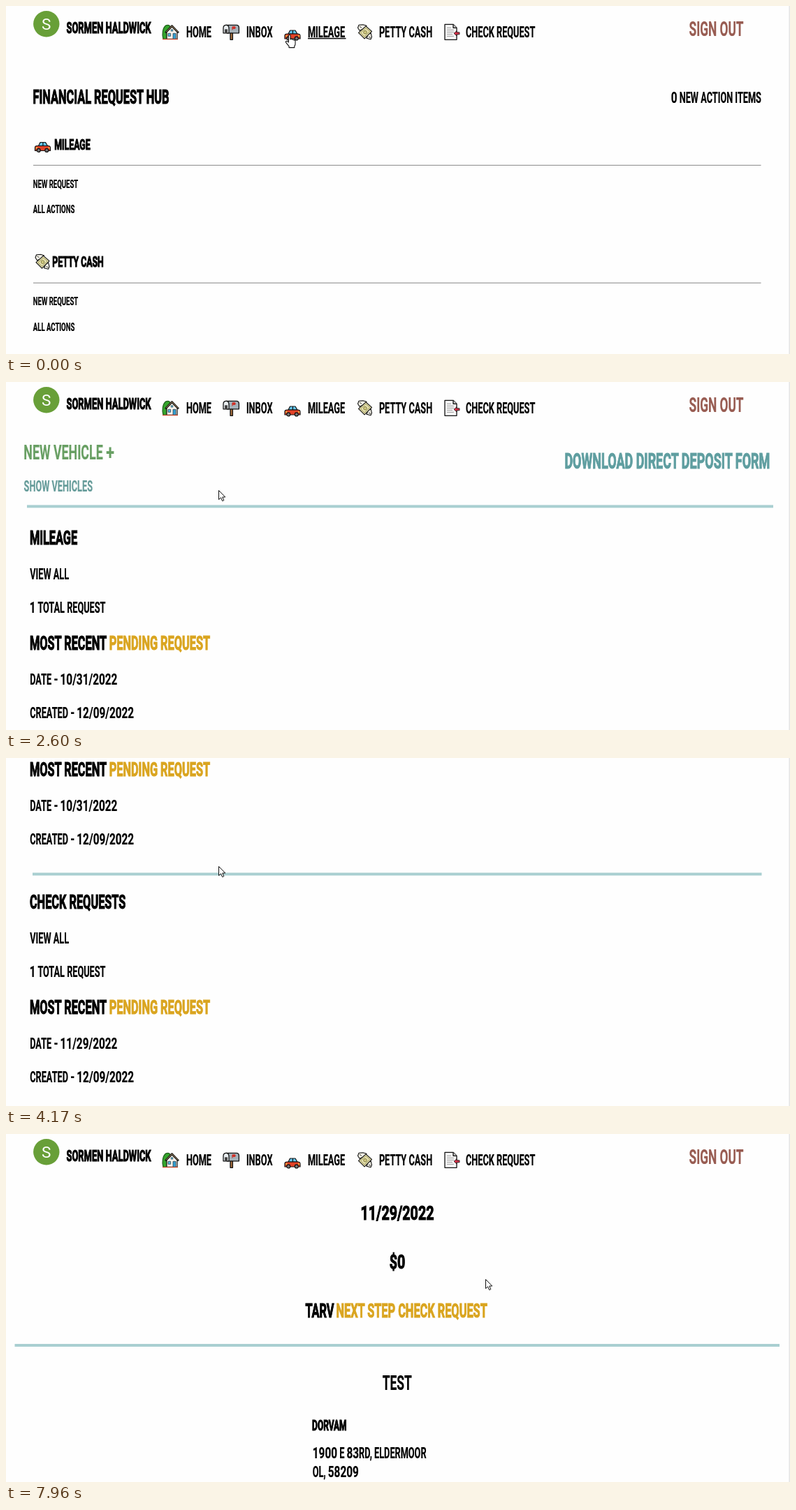
Write an HTML page that moves like this. It is 1122 px wide and 499 px high and loops after 8 s.

```html
<!DOCTYPE html>
<html lang="en">
<head>
<meta charset="utf-8">
<title>Financial request hub</title>
<style>
  html, body { margin: 0; width: 100%; height: 100%; overflow: hidden; background: #fefefe; }
  svg { display: block; width: 100%; height: 100%; }
  text { font: bold 16px Roboto, "Liberation Sans", sans-serif; white-space: pre; }
  .type text { stroke: currentColor; fill: currentColor; stroke-width: .2; vector-effect: non-scaling-stroke; }
  .heavy text { stroke-width: .95; }
</style>
</head>
<body>
<svg viewBox="0 0 1122 499" xmlns="http://www.w3.org/2000/svg">
  <defs>
    <g id="house" stroke="#111" stroke-width="1.2" stroke-linejoin="round">
      <path d="M2 22C0 15 1 6 6 2.5 10 1 13 3 13 8V22Z" fill="#35a52c" stroke="#1d5c18"/>
      <path d="M7 12 14.5 4.5 22 12V22H7Z" fill="#f6f4ee"/>
      <path d="M5 13 14.5 3 24 13" fill="none" stroke-width="2.4"/>
      <path d="M6 12 14.5 3.4 23 12" fill="none" stroke="#c9a577" stroke-width=".9"/>
      <path d="M9 14h3.6v4H9z" fill="#57bfe8" stroke-width=".6"/>
      <path d="M16 14h4v8h-4z" fill="#35a3d8" stroke-width=".6"/>
      <path d="M13.2 8.4h2.6v2.4h-2.6z" fill="#57bfe8" stroke-width=".5"/>
      <path d="M1 22.3H23" stroke="#c7472c"/>
    </g>
    <g id="mail" stroke="#111" stroke-width="1.3" stroke-linejoin="round">
      <path d="M11 13h3.4v10H11z" fill="#a9703f"/>
      <path d="M5 2H20Q23.4 2 23.4 6V13.5H6Z" fill="#a5b1b9"/>
      <path d="M1 13.5V6.5Q1 2 5 2T9 6.5V13.5Z" fill="#e9edf0"/>
      <path d="M3 8h4v5.5H3z" fill="#444" stroke="none"/>
      <path d="M14 9V4.5H18V7H15" fill="#e3352c" stroke="#c42a20" stroke-width="1"/>
    </g>
    <g id="car" stroke="#111" stroke-width="1.2" stroke-linejoin="round">
      <path d="M6 9 8.5 4H16L19 9Z" fill="#62c4ec"/>
      <path d="M12.4 4V9" fill="none"/>
      <path d="M1 16V11.5Q1 9 4 9H20Q23 9 23 12V16Z" fill="#e34227"/>
      <path d="M2 12h2.5M20 12h2.5" stroke="#ffd24a" stroke-width="1.5"/>
      <circle cx="6.2" cy="15.4" r="2.5" fill="#777"/>
      <circle cx="17.8" cy="15.4" r="2.5" fill="#777"/>
    </g>
    <g id="cash" stroke="#111" stroke-width="1.1" stroke-linejoin="round">
      <path d="M4 10 1.5 6 3 2 9 1.5 14 3 11 7ZM14 21 20 22.5 21.5 19 20 13 16 16Z" fill="#f4f2e8"/>
      <path d="M2.5 13 13 3.5 21.5 11 11 21.5Z" fill="#e6e1b0"/>
      <path d="M5.5 13 13 6.3 18.6 11 11 18.7Z" fill="none" stroke="#8d8746" stroke-width=".8"/>
      <circle cx="12" cy="12.4" r="2.3" fill="#d3cc85" stroke="#6f6a33" stroke-width=".8"/>
      <path d="M4 4 7 6M17 19 20 20" stroke-width=".8"/>
    </g>
    <g id="sheet" stroke="#111" stroke-width="1.3" stroke-linejoin="round">
      <path d="M2 1H14L19 6V23H2Z" fill="#f6f6f6"/>
      <path d="M14 1V6H19" fill="#ccc"/>
      <path d="M5 6h6M5 9h10M5 12h10M5 15h8M5 18h10" stroke="#999" stroke-width="1"/>
      <path d="M15 14 19 10.5V12.5H23V15.5H19V17.5Z" fill="#d8304a" stroke-width=".8"/>
    </g>
  </defs>
  <g id="scroll">
    <g id="nav"></g><g id="home"></g><g id="profile"></g><g id="request"></g>
  </g>
  <path d="M1121.2 0V499" stroke="#e4e4e4" stroke-width="1.5"/>
  <g id="cursor" stroke="#111" stroke-linejoin="round" fill="#fff">
    <path id="arrow" d="M.5 .5V13.6L3.6 10.8 5.6 15.6 7.8 14.7 5.8 10H9.8Z" stroke-width="1"/>
    <path id="hand" stroke-width="1.1" d="M-1.6 11V1.6Q-1.6 .3 -.3 .3T1 1.6V7Q1.4 6 2.4 6T3.6 7.3Q4 6.6 5 6.7T6 8.1Q6.5 7.5 7.2 7.7T8 9V13.5Q8 15 6.8 16.6V18.6H-1V16.6Q-3 14.6 -5.3 11.4Q-6.2 10 -5 9.4T-3 10Z"/>
  </g>
</svg>
<script>
const NS = 'http://www.w3.org/2000/svg';
const $ = id => document.getElementById(id);
const pen = document.createElement('canvas').getContext('2d');
pen.font = 'bold 100px Roboto, "Liberation Sans", sans-serif';

// One condensed face: letters are narrow, numerals and signs a little wider.
const LETTER = .59, NUMERAL = .71;
const GOLD = '#daa520', TEAL = '#a9cfd1', BODY = 21.6, HEAD = 27.7;

function add(parent, tag, attrs, content) {
  const node = document.createElementNS(NS, tag);
  for (const key in attrs) node.setAttribute(key, attrs[key]);
  if (content) node.textContent = content;
  return parent.appendChild(node);
}

function write(parent, x, y, size, words, { heavy, color = '#000', align = 0 } = {}) {
  const runs = words.match(/[\d\/$+-]+|[^\d\/$+-]+/g).map(run => {
    const scale = /[\d\/$+-]/.test(run) ? NUMERAL : LETTER;
    return { run, scale, width: pen.measureText(run).width * size / 100 * scale };
  });
  x -= align * runs.reduce((sum, r) => sum + r.width, 0);
  const group = add(parent, 'g', { class: heavy ? 'type heavy' : 'type', color });
  for (const r of runs) {
    add(group, 'text', {
      transform: `translate(${x} ${y}) scale(${r.scale} 1)`, style: `font-size:${size}px`
    }, r.run);
    x += r.width;
  }
}

const title = (parent, x, y, words, color) => write(parent, x, y, HEAD, words, { heavy: true, color });
const rule = (parent, x, y, right, height, fill) =>
  add(parent, 'rect', { x, y, width: right - x, height, fill });
const icon = (parent, name, x, y) =>
  add(parent, 'use', { href: '#' + name, transform: `translate(${x} ${y})` });

// Navigation
const nav = $('nav');
add(nav, 'circle', { cx: 57.8, cy: 25.7, r: 18.7, fill: '#689f38' });
add(nav, 'text', { x: 57.8, y: 34, fill: '#fff', 'text-anchor': 'middle',
  style: 'font-size:22.5px;font-weight:400' }, 'S');
write(nav, 86.5, 39, 21.9, 'SORMEN HALDWICK', { heavy: true });
const links = [
  ['HOME', 'house', 223, 258, 293.5],
  ['INBOX', 'mail', 310, 344, 382],
  ['MILEAGE', 'car', 398, 432, 486.5],
  ['PETTY CASH', 'cash', 502, 534, 609],
  ['CHECK REQUEST', 'sheet', 626, 658, 758]
].map(([label, image, left, x, right]) => {
  icon(nav, image, left, image === 'car' ? 31 : 25.3);
  write(nav, x - .1, 44.8, BODY, label);
  return { left, right, line: rule(nav, x, 45.8, right, 1.5, '#000') };
});
write(nav, 1055.5, 43, 29.3, 'SIGN OUT', { color: '#985c52', align: 1 });

// Hub
const home = $('home');
title(home, 38.6, 140.4, 'FINANCIAL REQUEST HUB');
write(home, 1081, 138.7, BODY, '0 NEW ACTION ITEMS', { align: 1 });
[['MILEAGE', 'car', 69.3], ['PETTY CASH', 'cash', 66.3], ['CHECK REQUEST', 'sheet', 66.3]]
  .forEach(([label, image, x], i) => {
    const y = i * 168.7;
    icon(home, image, 40.5, y + (image === 'car' ? 191.5 : 186));
    write(home, x, y + 205.6, 20.8, label, { heavy: true });
    rule(home, 39, y + 227.8, 1080.5, 1.2, '#999');
    write(home, 38.8, y + 260.7, 16.2, 'NEW REQUEST');
    write(home, 38.8, y + 297.2, 16.2, 'ALL ACTIONS');
  });

// Profile
const profile = $('profile');
write(profile, 25.3, 111, 30.2, 'NEW VEHICLE +', { color: '#689f63' });
write(profile, 25.6, 157, BODY, 'SHOW VEHICLES', { color: '#669c9a' });
write(profile, 1094.5, 124, 30.5, 'DOWNLOAD DIRECT DEPOSIT FORM', { heavy: true, color: '#5f9ea0', align: 1 });
rule(profile, 30, 176.4, 1098, 4, TEAL);
rule(profile, 38, 522.5, 1081.5, 4, TEAL);
[['MILEAGE', '10/31/2022', 0], ['CHECK REQUESTS', '11/29/2022', 341]].forEach(([label, date, y]) => {
  title(profile, 33.9, y + 232.7, label);
  write(profile, 34.2, y + 282.5, BODY, 'VIEW ALL');
  write(profile, 33.8, y + 331, BODY, '1 TOTAL REQUEST');
  title(profile, 33.9, y + 384.3, 'MOST RECENT');
  title(profile, 147.7, y + 384.3, 'PENDING REQUEST', GOLD);
  write(profile, 34.2, y + 434, BODY, 'DATE - ' + date);
  write(profile, 34.2, y + 482.3, BODY, 'CREATED - 12/09/2022');
});
const pendingLine = rule(profile, 34, 726.3, 292.8, 2.4, '#000');

// Request detail
const request = $('request');
const middle = { heavy: true, align: .5 };
write(request, 560, 123, HEAD, '11/29/2022', middle);
write(request, 560, 193, HEAD, '$0', middle);
write(request, 469.5, 263, HEAD, 'TARV', { heavy: true, align: 1 });
title(request, 472.4, 263, 'NEXT STEP CHECK REQUEST', GOLD);
rule(request, 12.5, 301, 1107, 4, TEAL);
write(request, 559.7, 366.6, 29.5, 'TEST', { align: .5 });
write(request, 438.1, 424.6, 20.3, 'DORVAM', { heavy: true });
write(request, 438.8, 464.6, BODY, '1900 E 83RD, ELDERMOOR');
write(request, 438.8, 492, BODY, 'OL, 58209');

// Motion: [time, values...]
const LOOP = 8000, TO_PROFILE = 2090, TO_REQUEST = 7010;
const scrollKeys = [
  [0, 0], [420, 0], [760, 166.4], [850, 166.4], [1030, 0],
  [3420, 0], [3760, 166.4], [3900, 166.4], [4170, 358], [4730, 358], [4990, 333],
  [TO_REQUEST - 1, 333], [TO_REQUEST, 0]
];
const cursorKeys = [
  [0, 406, 41], [30, 406, 41], [330, 391, 89], [1180, 391, 89], [1450, 560, 38],
  [1990, 131, 28], [2130, 150, 18], [2600, 304, 155], [5080, 304, 155],
  [5590, 207, 392], [6010, 207, 392], [6070, 208, 391], [6480, 208, 391],
  [6680, 590, 268], [6950, 590, 268], [7010, 590, 259], [7560, 590, 259], [7960, 686, 208]
];

function sample(keys, t) {
  const i = keys.findIndex(k => k[0] > t);
  if (i < 0) return keys[keys.length - 1].slice(1);
  const [a, b] = [keys[i - 1], keys[i]];
  const p = (t - a[0]) / (b[0] - a[0]);
  const e = p * p * (3 - 2 * p);
  return a.slice(1).map((v, n) => v + (b[n + 1] - v) * e);
}

const show = (node, on) => node.setAttribute('visibility', on ? 'visible' : 'hidden');
const inside = (x, y, l, t, r, b) => x >= l && x <= r && y >= t && y <= b;

function draw(t) {
  const [scroll] = sample(scrollKeys, t);
  const [x, y] = sample(cursorKeys, t);
  const page = t < TO_PROFILE ? home : t < TO_REQUEST ? profile : request;
  for (const p of [home, profile, request]) p.style.display = p === page ? '' : 'none';
  $('scroll').setAttribute('transform', `translate(0 ${-scroll})`);

  const py = y + scroll;
  let hot = inside(x, py, 39, 8, 209, 46);
  for (const link of links) {
    const over = inside(x, py, link.left, 25, link.right, 52);
    show(link.line, over);
    hot = hot || over;
  }
  const pending = page === profile && inside(x, py, 34, 702, 293, 730);
  show(pendingLine, pending);
  hot = hot || pending;

  show($('hand'), hot);
  show($('arrow'), !hot);
  $('cursor').setAttribute('transform', `translate(${x} ${y})`);
}

function tick() {
  draw(performance.now() % LOOP);
  requestAnimationFrame(tick);
}
tick();
</script>
</body>
</html>
```
